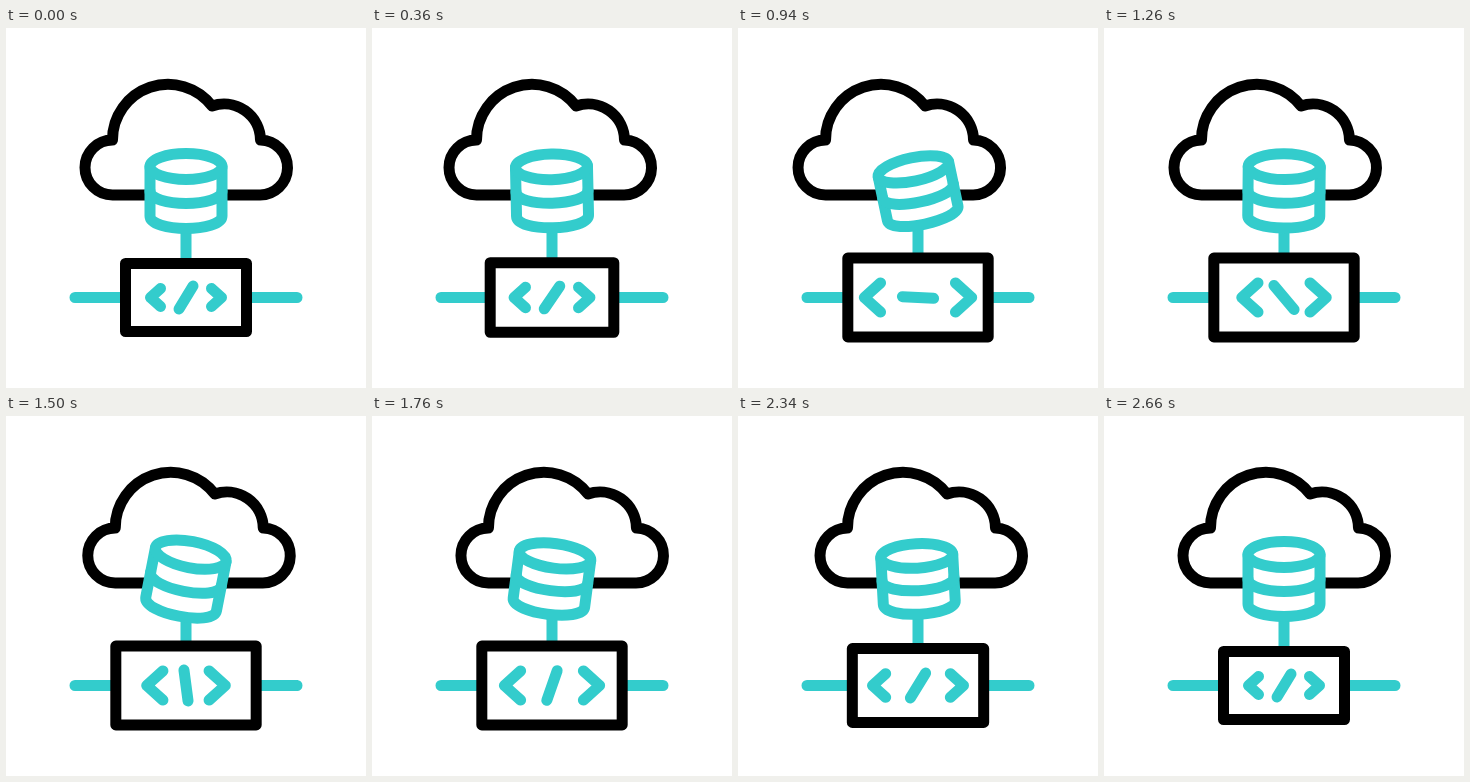
Animation of 360 by 360 pixels, one loop 3 s. Source, as an HTML page:

```html
<!DOCTYPE html>
<html lang="en">
<head>
<meta charset="utf-8">
<title>Cloud data</title>
<style>
  html, body { margin: 0; width: 100%; height: 100%; overflow: hidden; background: #fff; }
  svg { display: block; width: 100vw; height: 100vh; }
  path, rect, ellipse {
    fill: none; stroke-width: 11; stroke-linecap: round; stroke-linejoin: round;
    vector-effect: non-scaling-stroke;
  }
  .dark { stroke: #000; }
  .teal { stroke: #33cccc; }
  .solid { fill: #fff; }
</style>
</head>
<body>
<svg viewBox="0 0 360 360">
  <path class="teal" d="M69 269.5H291M180 190V235"/>
  <path id="cloud" class="dark" d="M106.5 167A27.5 27.5 0 0 1 106.5 112A55.5 55.5 0 0 1 206 78A36.5 36.5 0 0 1 254.5 112A27.5 27.5 0 0 1 253.5 167Z"/>
  <g id="disk" class="teal">
    <path class="solid" d="M-36 -24.5V25C-36 41.5 36 41.5 36 25V-24.5"/>
    <ellipse class="solid" cy="-24.5" rx="36" ry="13"/>
    <path d="M-36 0C-36 16.5 36 16.5 36 0"/>
  </g>
  <g id="panel">
    <rect class="dark solid" x="-60.5" y="-34" width="121" height="68"/>
    <g class="teal">
      <path id="left" d="M10 -9L0 0L10 9"/>
      <path id="right" d="M10 -9L0 0L10 9"/>
      <path id="slash" d="M7 -11.5L-7 11.5"/>
    </g>
  </g>
</svg>
<script>
  const LOOP = 3000, START = 220, BEAT = 610;

  const smooth = p => p * p * (3 - 2 * p);

  // Eased value at beat b, through [beat, value] keys.
  function ease(b, ...keys) {
    const next = keys.findIndex(([at]) => at > b);
    if (next < 0) return keys[keys.length - 1][1];
    if (next === 0) return keys[0][1];
    const [b0, v0] = keys[next - 1], [b1, v1] = keys[next];
    return v0 + (v1 - v0) * smooth((b - b0) / (b1 - b0));
  }

  const place = (id, transform) =>
    document.getElementById(id).setAttribute('transform', transform);

  function draw(time) {
    const b = (time % LOOP - START) / BEAT;
    const drift = ease(b, [0, 0], [1.15, -19], [2.56, 10], [4, 0]);
    const tilt = ease(b, [0, 0], [1.15, -12], [2.23, 12], [3.1, -5], [4, 0]);
    const spread = ease(b, [0, 0], [1, 12], [2, -2], [3, 12], [4, 0]);
    const size = ease(b, [0, 1], [1, 1.16], [3, 1.16], [4, 1]);
    const arrow = ease(b, [0, 1], [0.65, 1.4], [3, 1.4], [4, 1]);
    const spin = ease(b, [0, 0], [3, 180]);
    const tip = 35.5 + spread;

    place('cloud', `translate(${drift})`);
    place('disk', `translate(180 163) rotate(${tilt}) scale(1 ${1 - spread * 0.009})`);
    place('panel', `translate(180 269.5) scale(${size})`);
    place('left', `translate(${-tip}) scale(${arrow})`);
    place('right', `translate(${tip}) scale(${-arrow})`);
    place('slash', `rotate(${spin})`);
  }

  function tick() {
    draw(performance.now());
    requestAnimationFrame(tick);
  }
  tick();
</script>
</body>
</html>
```
